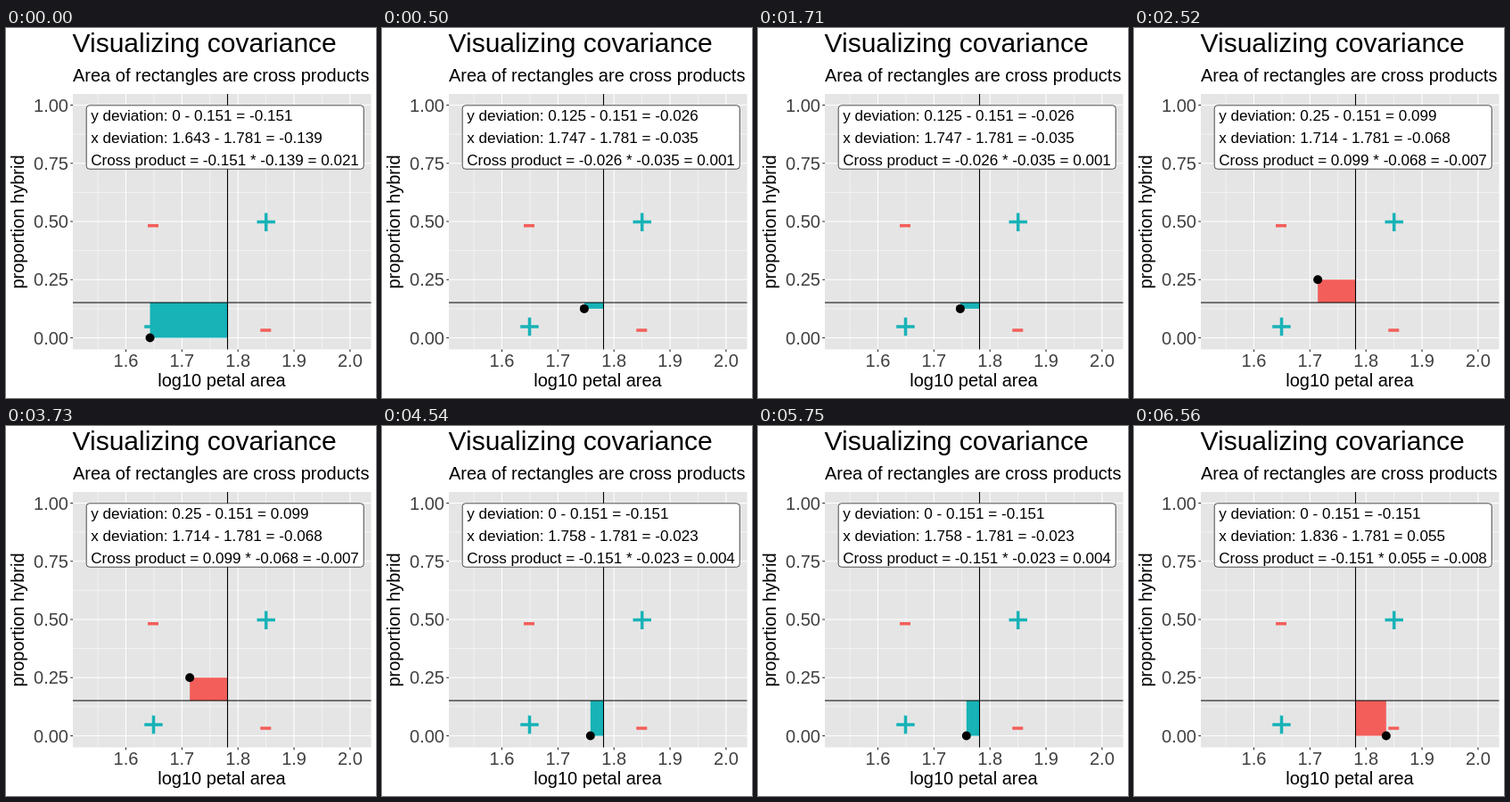
An HTML page that plays this animation: 415 by 415 pixels, repeating every 8000 ms.

```html
<!DOCTYPE html>
<html lang="en">
<head>
<meta charset="utf-8">
<title>Visualizing covariance</title>
<style>
html, body { margin: 0; width: 100%; height: 100%; overflow: hidden; background: #fff; }
svg { display: block; width: 415px; height: 415px; }
text { font: 20px "Liberation Sans", Arial, sans-serif; }
.title { font-size: 30px; }
.tick { fill: #404040; }
.note { font-size: 17.07px; }
</style>
</head>
<body>
<svg viewBox="0 0 415 415">
  <rect x="75" y="74" width="334.5" height="286.5" fill="#e5e5e5"/>
  <g id="grid"></g>
  <text class="title" x="74.5" y="27">Visualizing covariance</text>
  <text x="75" y="60">Area of rectangles are cross products</text>
  <text x="242" y="402" text-anchor="middle">log10 petal area</text>
  <text transform="translate(20 217.5) rotate(-90)" text-anchor="middle">proportion hybrid</text>
  <g stroke-width="3.5">
    <path stroke="#17b3b7" d="M281.5 217.5h20.5M291.7 207.5v20.5M155.2 335h20.5M165.5 324.8v20.5"/>
    <path stroke="#f35e5a" d="M159 221.7h12M285.3 339h12"/>
  </g>
  <rect id="area"/>
  <path stroke="#000" stroke-width="1.07" d="M248.5 74v286.5M75 308h334.5"/>
  <circle id="dot" r="5"/>
  <rect x="90.2" y="86.8" width="311" height="71.4" rx="3.5" fill="#fff" stroke="#000" stroke-width=".71"/>
  <text class="note" x="95.2" y="104"></text>
  <text class="note" x="95.2" y="129"></text>
  <text class="note" x="95.2" y="154"></text>
</svg>
<script>
const $ = id => document.getElementById(id);
const notes = document.querySelectorAll('.note');
const px = x => 134.5 + (x - 1.6) * 628.5;
const py = y => 347.5 - y * 261;
const meanX = 248.5, meanY = 308;

// start ms, y, x, y deviation, x deviation, cross product
const steps = [
  [0, 0, 1.643, -0.151, -0.139, 0.021],
  [500, 0.125, 1.747, -0.026, -0.035, 0.001],
  [2520, 0.25, 1.714, 0.099, -0.068, -0.007],
  [4540, 0, 1.758, -0.151, -0.023, 0.004],
  [6560, 0, 1.836, -0.151, 0.055, -0.008]
];

function line(d, width, color = '#fff') {
  return `<path d="${d}" stroke="${color}" stroke-width="${width}"/>`;
}

function drawGrid() {
  let minor = '', major = '', ticks = '', labels = '';
  for (let i = 0; i < 5; i++) {
    const x = px(1.6 + i / 10), y = py(i / 4);
    minor += `M${px(1.55 + i / 10)} 74v286.5`;
    if (i < 4) minor += `M75 ${py(i / 4 + 0.125)}h334.5`;
    major += `M${x} 74v286.5M75 ${y}h334.5`;
    ticks += `M${x} 360.5v2.75M72.25 ${y}h2.75`;
    labels += `<text class="tick" x="${x}" y="380" text-anchor="middle">${(1.6 + i / 10).toFixed(1)}</text>` +
      `<text class="tick" x="70" y="${y + 7}" text-anchor="end">${(i / 4).toFixed(2)}</text>`;
  }
  $('grid').innerHTML = line(minor, 0.53) + line(major, 1.07) + line(ticks, 1.07, '#262626') + labels;
}

function set(el, attrs) {
  for (const key in attrs) el.setAttribute(key, attrs[key]);
}

function show([, y, x, dy, dx, product]) {
  const cx = px(x), cy = py(y);
  set($('dot'), { cx, cy });
  set($('area'), {
    x: Math.min(cx, meanX), y: Math.min(cy, meanY),
    width: Math.abs(cx - meanX), height: Math.abs(cy - meanY),
    fill: product > 0 ? '#17b3b7' : '#f35e5a'
  });
  notes[0].textContent = `y deviation: ${y} - 0.151 = ${dy}`;
  notes[1].textContent = `x deviation: ${x} - 1.781 = ${dx}`;
  notes[2].textContent = `Cross product = ${dy} * ${dx} = ${product}`;
}

let current;
function frame() {
  const t = performance.now() % 8000;
  const step = steps.filter(s => s[0] <= t).pop();
  if (step !== current) show(current = step);
  requestAnimationFrame(frame);
}

drawGrid();
frame();
</script>
</body>
</html>
```
